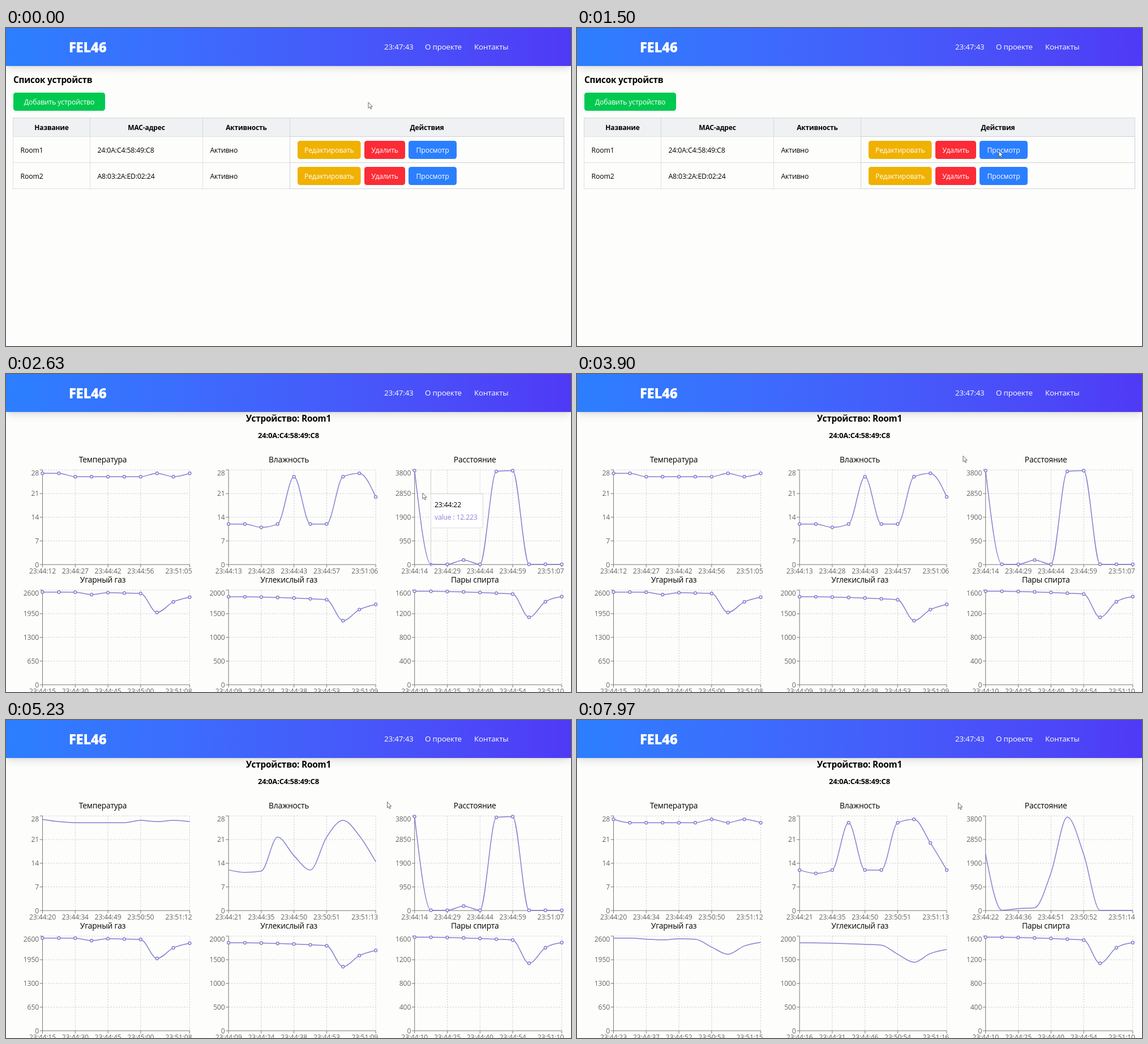
An HTML page that plays this animation: 998 px wide and 561 px high, repeating every 8000 ms.

```html
<!DOCTYPE html>
<html lang="ru">
<head>
<meta charset="utf-8">
<title>Устройства</title>
<style>
  html, body { margin: 0; width: 100%; height: 100%; overflow: hidden; background: #fdfdfb; }
  header {
    position: absolute; inset: 0 0 auto; height: 67px;
    background: linear-gradient(to right, #2b7fff, #4f39f6);
    background: linear-gradient(to right in oklab, #2b7fff, #4f39f6);
    box-shadow: 0 8px 12px -2.4px #0000001a, 0 3.2px 4.8px -3.2px #0000001a;
  }
  svg { position: absolute; left: 0; top: 0; }
  text { font-family: "Open Sans", "Noto Sans", sans-serif; letter-spacing: -.014em; white-space: pre; }
  .medium { font-weight: 500; }
  .bold { font-weight: 700; }
  .logo { font-weight: 800; }
  .mid { text-anchor: middle; }
  .end { text-anchor: end; }
  .white { fill: #fff; }
  .tick { fill: #666; }
  .grid { stroke: #cbcbdb; stroke-dasharray: 2.4 2.4; fill: none; }
  .axis { stroke: #777; fill: none; }
  .line, .dots { stroke: #8480d2; stroke-width: 1.5; fill: none; }
  .dots { fill: #fff; }
</style>
</head>
<body>
<header></header>
<svg id="stage" width="998" height="561" viewBox="0 0 998 561"></svg>
<script>
const LOOP = 8000, OPEN_AT = 1590, MORPH = 1500;
const LEFT = 64.5, BASE = 336.2, WIDTH = 260, HEIGHT = 167;
const POINTS = 10, STEP = WIDTH / (POINTS - 1);

function add(parent, tag, attrs = {}) {
  const el = document.createElementNS('http://www.w3.org/2000/svg', tag);
  for (const k in attrs) el.setAttribute(k, attrs[k]);
  return parent.appendChild(el);
}
// y is the middle of the capitals
function label(parent, str, x, y, size, cls = '') {
  const el = add(parent, 'text', { x, y: y + size * .36, 'font-size': size, class: cls });
  el.textContent = str;
  return el;
}
function show(el, on) { el.setAttribute('display', on ? 'inline' : 'none'); }

const stage = document.getElementById('stage');
const listPage = add(stage, 'g'), devicePage = add(stage, 'g');
label(stage, 'FEL46', 111, 34.5, 24, 'logo white');
label(stage, '23:47:43', 668, 33.5, 13.4, 'medium white');
label(stage, 'О проекте', 740, 33.5, 13.4, 'medium white');
label(stage, 'Контакты', 827, 33.5, 13.4, 'medium white');

// ---- device list ----
function button(str, x, y, width, fill) {
  add(listPage, 'rect', { x, y, width, height: 32, rx: 4.5, fill });
  label(listPage, str, x + width / 2, y + 16.5, 12.3, 'white mid');
}
function cell(x, y, width, height, stroke, fill = 'none') {
  add(listPage, 'rect', { x, y, width, height, stroke, fill });
}
label(listPage, 'Список устройств', 13, 91, 15.3, 'bold');
button('Добавить устройство', 13, 114, 162, '#00c950');

const edges = [12.5, 148.5, 347.5, 501.5, 985.5];
const heads = ['Название', 'MAC-адрес', 'Активность', 'Действия'];
const rows = [['Room1', '24:0A:C4:58:49:C8', 'Активно'], ['Room2', 'A8:03:2A:ED:02:24', 'Активно']];
heads.forEach((head, i) => {
  const x = edges[i], width = edges[i + 1] - x;
  cell(x, 158.5, width, 33, '#d5d9e2', '#eff1f2');
  label(listPage, head, x + width / 2, 176, 12, 'bold mid');
  rows.forEach((row, r) => {
    const y = 191.5 + r * 46;
    cell(x, y, width, 46, row[i] ? '#dfe0e2' : '#ccd1dd');
    if (row[i]) label(listPage, row[i], x + 13, y + 24, 12.3);
  });
});
rows.forEach((_, r) => {
  const y = 199 + r * 46;
  button('Редактировать', 515, y, 111.5, '#f0b100');
  button('Удалить', 633, y, 72, '#fb2c36');
  button('Просмотр', 711, y, 85, '#2b7fff');
});

// ---- device charts ----
label(devicePage, 'Устройство: Room1', 499, 78.5, 15.4, 'bold mid');
label(devicePage, rows[0][1], 499, 108, 13, 'bold mid');

// Readings: a level with a slow drift, a sudden dip that recovers, and single spikes.
const charts = [
  { title: 'Температура', max: 28, level: 26, first: 12.7, update: 4615, spikes: { 0: 1, 1: 1, 7: 1, 9: 1 } },
  { title: 'Влажность', max: 28, level: 12, first: 13.7, update: 4615, spikes: { 2: -1, 4: 14, 7: 14, 8: 15, 9: 8 } },
  { title: 'Расстояние', max: 3800, level: 12, first: 14.9, update: 7600, spikes: { 0: 3763, 3: 170, 5: 3728, 6: 3760 } },
  { title: 'Угарный газ', max: 2600, level: 2546, first: 15.9, update: 7600, drift: 39, dip: 522, recovery: .44, spikes: { 3: -60 } },
  { title: 'Углекислый газ', max: 2000, level: 1860, first: 9.3, update: 7600, drift: 64, dip: 443, recovery: .47 },
  { title: 'Пары спирта', max: 1600, level: 1581, first: 10.7, update: Infinity, drift: 48, dip: 393, recovery: .33 },
];

function reading({ level, drift = 0, dip = 0, recovery = 0, spikes = {} }, k) {
  const sag = drift * Math.min(1, k / 6) ** 2;
  return level - sag - (k < 7 ? 0 : dip * recovery ** (k - 7)) + (spikes[k] || 0);
}
// one reading each 7.36 s, with a pause of some minutes before the eighth
function clock(chart, k) {
  const s = Math.floor(k < 7 ? chart.first + 7.36 * k : 410.5 + charts.indexOf(chart) + 7.36 * (k - 7));
  const two = n => String(n).padStart(2, '0');
  return `23:${44 + Math.floor(s / 60)}:${two(s % 60)}`;
}

const TICKS = [0, 2, 4, 6, 9];
charts.forEach((chart, i) => {
  const g = add(devicePage, 'g', { transform: `translate(${i % 3 * 328.6} ${Math.floor(i / 3) * 212})` });
  const top = BASE - HEIGHT, right = LEFT + WIDTH;
  label(g, chart.title, 171, 151, 13.8, 'medium mid');

  let grid = '', axis = `M${LEFT} ${top}V${BASE}H${right}`;
  for (let k = 0; k <= 4; k++) {
    const y = BASE - k * HEIGHT / 4;
    if (k) grid += `M${LEFT} ${y}H${right}`;
    axis += `M${LEFT - 4.8} ${y}h4.8`;
    label(g, chart.max * k / 4, 58, Math.max(y, 175), 12.2, 'tick end');
  }
  chart.ticks = TICKS.map(k => {
    const x = LEFT + k * STEP;
    if (k) grid += `M${x} ${top}V${BASE}`;
    axis += `M${x} ${BASE}v4.8`;
    return label(g, '', Math.min(x, 305), 347.5, 12.2, 'tick mid');
  });
  add(g, 'path', { d: grid, class: 'grid' });
  add(g, 'path', { d: axis, class: 'axis' });
  chart.line = add(g, 'path', { class: 'line' });
  chart.dots = add(g, 'g', { class: 'dots' });
  chart.circles = Array.from({ length: POINTS }, (_, k) => add(chart.dots, 'circle', { cx: LEFT + k * STEP, r: 2.4 }));
});

const tooltip = add(devicePage, 'g');
add(tooltip, 'path', { d: 'M750.5 169V336', stroke: '#ccc' });
add(tooltip, 'circle', { cx: 750.3, cy: 335.5, r: 2.6, fill: '#8884d8', stroke: '#fff', 'stroke-width': .8 });
add(tooltip, 'rect', { x: 750.5, y: 211.5, width: 92, height: 60, fill: '#fff', stroke: '#d8d8d8' });
label(tooltip, '23:44:22', 757, 230.5, 12.2);
label(tooltip, 'value : 12.223', 757, 252.5, 12.2).setAttribute('fill', '#8884d8');

const pointer = add(stage, 'path', {
  d: 'M0 0V10.4L2.4 8.2 4.1 12 5.7 11.3 4.1 7.6H7.3Z',
  fill: '#fff', stroke: '#444', 'stroke-width': .8,
});

// ---- motion ----
const bezier = (u, a, b) => 3 * u * (1 - u) ** 2 * a + 3 * u * u * (1 - u) * b + u ** 3;
// CSS "ease"
function ease(p) {
  if (p <= 0 || p >= 1) return p <= 0 ? 0 : 1;
  let lo = 0, hi = 1;
  for (let i = 0; i < 24; i++) {
    const mid = (lo + hi) / 2;
    if (bezier(mid, .25, .25) < p) lo = mid; else hi = mid;
  }
  return bezier(lo, .1, 1);
}

// monotone cubic through evenly spaced points
function curve(ys) {
  const n = ys.length, s = [], m = [];
  for (let i = 0; i < n - 1; i++) s.push(ys[i + 1] - ys[i]);
  for (let i = 1; i < n - 1; i++) {
    const a = s[i - 1], b = s[i];
    m[i] = (Math.sign(a) + Math.sign(b)) * Math.min(Math.abs(a), Math.abs(b), Math.abs(a + b) / 4);
  }
  m[0] = (3 * s[0] - m[1]) / 2;
  m[n - 1] = (3 * s[n - 2] - m[n - 2]) / 2;
  let d = `M${LEFT} ${ys[0]}`;
  for (let i = 0; i < n - 1; i++) {
    const x = LEFT + i * STEP;
    d += `C${x + STEP / 3} ${ys[i] + m[i] / 3} ${x + STEP * 2 / 3} ${ys[i + 1] - m[i + 1] / 3} ${x + STEP} ${ys[i + 1]}`;
  }
  return d;
}

// on update each point moves to the value of the next reading
function drawChart(chart, t) {
  const p = (t - chart.update) / MORPH, e = ease(p), shift = p < 0 ? 0 : 1;
  const ys = chart.circles.map((_, k) => {
    const value = reading(chart, k) * (1 - e) + reading(chart, k + 1) * e;
    return BASE - value / chart.max * HEIGHT;
  });
  chart.line.setAttribute('d', curve(ys));
  chart.circles.forEach((c, k) => c.setAttribute('cy', ys[k]));
  show(chart.dots, p < 0 || p >= 1);
  chart.ticks.forEach((tick, i) => tick.textContent = clock(chart, TICKS[i] + shift));
}

const track = [
  { t: 0, x: 640, y: 131 }, { t: 770, x: 646, y: 155 }, { t: 1250, x: 747, y: 217 },
  { t: 1870, x: 742, y: 217 }, { t: 2500, x: 740, y: 215 }, { t: 3300, x: 682, y: 144.5 },
  { t: 4300, x: 682, y: 144.5 }, { t: 4800, x: 673.5, y: 144.5 }, { t: LOOP, x: 673.5, y: 146 },
];
function pointerAt(t) {
  const i = track.findIndex(key => key.t > t), a = track[i - 1], b = track[i];
  const u = (t - a.t) / (b.t - a.t), e = u * u * (3 - 2 * u);
  return [a.x + (b.x - a.x) * e, a.y + (b.y - a.y) * e];
}

function frame() {
  const t = performance.now() % LOOP, opened = t >= OPEN_AT;
  const [x, y] = pointerAt(t);
  show(listPage, !opened);
  show(devicePage, opened);
  show(tooltip, x > 721.5);
  pointer.setAttribute('transform', `translate(${x} ${y})`);
  if (opened) charts.forEach(chart => drawChart(chart, t));
  requestAnimationFrame(frame);
}
frame();
</script>
</body>
</html>
```
